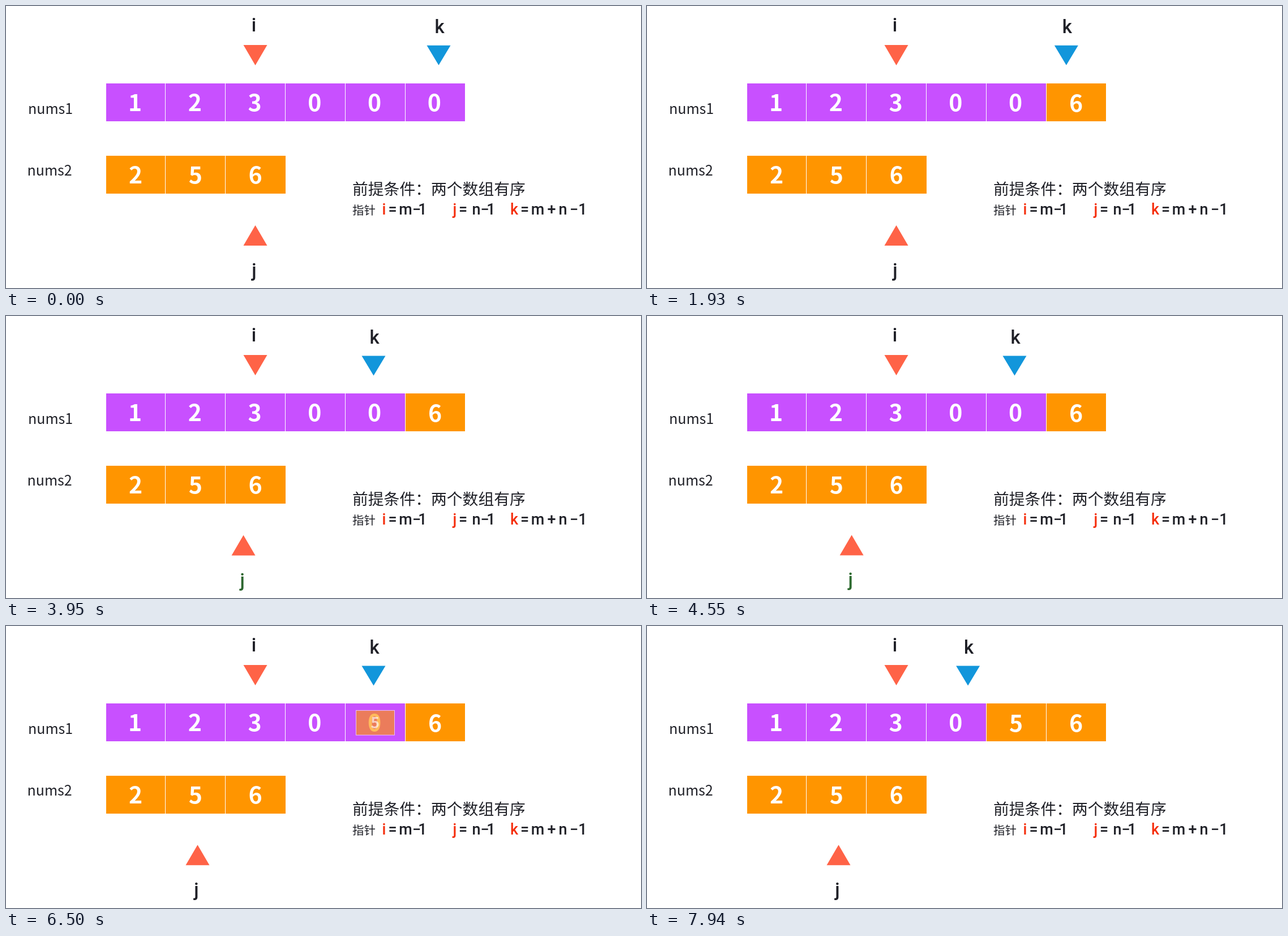
Write an HTML page with a canvas that moves like this. It is 1122 px wide and 499 px high and loops after 8 s.

```html
<!DOCTYPE html>
<html lang="zh">
<head>
<meta charset="utf-8">
<title>Merge sorted arrays</title>
<style>
html, body { margin: 0; width: 100%; height: 100%; overflow: hidden; background: #fff; }
canvas { display: block; }
</style>
</head>
<body>
<canvas id="stage" width="1122" height="499"></canvas>
<script>
const ctx = document.getElementById('stage').getContext('2d');
const LOOP = 8000;
const CJK = '"Noto Sans CJK SC", "Noto Sans CJK", "Noto Sans", sans-serif';
const LATIN = 'Roboto, "Open Sans", sans-serif';
const PURPLE = '#c850ff', ORANGE = '#ff9500', TOMATO = '#ff6347', BLUE = '#1296db';
const INK = '#1f2027', RED = '#f5300f';

const clamp = v => Math.min(1, Math.max(0, v));
const part = (t, start, length) => clamp((t - start) / length);
// Constant acceleration, then constant deceleration.
const ease = u => u < 0.5 ? 2 * u * u : 1 - 2 * (1 - u) * (1 - u);
const glide = (t, start) => ease(part(t, start, 1750));
const edge = n => Math.floor(176 + 105.8 * n);

function text(str, x, y, font, color = INK, align = 'center') {
  ctx.font = font;
  ctx.fillStyle = color;
  ctx.textAlign = align;
  ctx.fillText(str, x, y);
}

function digit(str, x, middle) {
  text(str, x, middle + 15, `bold 41px ${CJK}`, '#fff');
}

function row(values, y, color, dx) {
  ctx.fillStyle = color;
  ctx.fillRect(177, y, edge(values.length) - 176, 67);
  ctx.fillStyle = '#fff';
  for (let n = 1; n < values.length; n++) ctx.fillRect(edge(n), y, 1, 67);
  [...values].forEach((v, n) => digit(v, 228.2 + dx + 105.75 * n, y + 34));
}

// Card that zooms and fades in over a cell of the first row.
function card(value, n, u) {
  if (u <= 0) return;
  const left = edge(n);
  ctx.save();
  ctx.globalAlpha = u;
  ctx.translate(left + 53.5, 171 + 1.5 * (1 - u));
  ctx.scale(u, u);
  ctx.fillStyle = ORANGE;
  ctx.fillRect(-52.5, -34, 105, 67);
  ctx.strokeStyle = '#fff';
  ctx.lineWidth = 1 / u;
  ctx.strokeRect(-53, -34.5, 106, 68);
  digit(value, -0.5, 0.5);
  ctx.restore();
}

function triangle(x, base, tip, color) {
  ctx.fillStyle = color;
  ctx.beginPath();
  ctx.moveTo(x - 21, base);
  ctx.lineTo(x + 21, base);
  ctx.lineTo(x, tip);
  ctx.fill();
}

function pointer(name, x, baseline, color = INK) {
  text(name, x, baseline, `500 33px ${LATIN}`, color);
}

function notes() {
  const label = `300 25px ${CJK}`;
  text('nums1', 39, 191, label, INK, 'left');
  text('nums2', 37.5, 300, label, INK, 'left');
  text('前提条件：两个数组有序', 612, 334, `27.8px ${CJK}`, INK, 'left');
  text('指针', 612, 369, `20.5px ${CJK}`, INK, 'left');

  const font = `500 27px ${LATIN}`;
  const put = (str, x, color) => text(str, x, 369, font, color);
  put('i', 668, RED);
  put('=', 683);
  put('m', 706);
  put('−', 725.5);
  put('1', 736);
  put('j', 793, RED);
  put('=', 807.5);
  put('n', 831);
  put('−', 846);
  put('1', 857);
  put('k', 898, RED);
  put('=', 916.5);
  put('m', 939.5);
  put('+', 964);
  put('n', 984);
  put('−', 1003.5);
  put('1', 1019);
}

function draw(t) {
  ctx.fillStyle = '#fff';
  ctx.fillRect(0, 0, 1122, 499);

  row('123000', 137, PURPLE, 0);
  row('256', 265, ORANGE, 0.8);
  card('6', 5, part(t, 730, 500));
  card('5', 4, part(t, 6180, 500));
  notes();

  pointer('i', 438, 45);
  triangle(440.5, 69, 105, TOMATO);

  const first = glide(t, 1370);
  const kx = 764.5 - 115 * (first + glide(t, 6850));
  pointer('k', kx + 1.5, 48 + first);
  triangle(kx, 69.7 + first * 0.8, 104.7 + first * 0.8, BLUE);

  const step = glide(t, 3390);
  const jx = 440.5 - 102 * step;
  const green = Math.sin(Math.PI * part(t, 3250, 2080));
  const mix = (a, b) => Math.round(a + (b - a) * green);
  pointer('j', jx - 2, 479 - 1.5 * step, `rgb(${mix(31, 46)},${mix(32, 112)},${mix(39, 48)})`);
  triangle(jx, 424 - 0.8 * step, 388 - 0.8 * step, TOMATO);
}

const begin = performance.now();
function tick() {
  draw((performance.now() - begin) % LOOP);
  requestAnimationFrame(tick);
}
tick();
</script>
</body>
</html>
```
